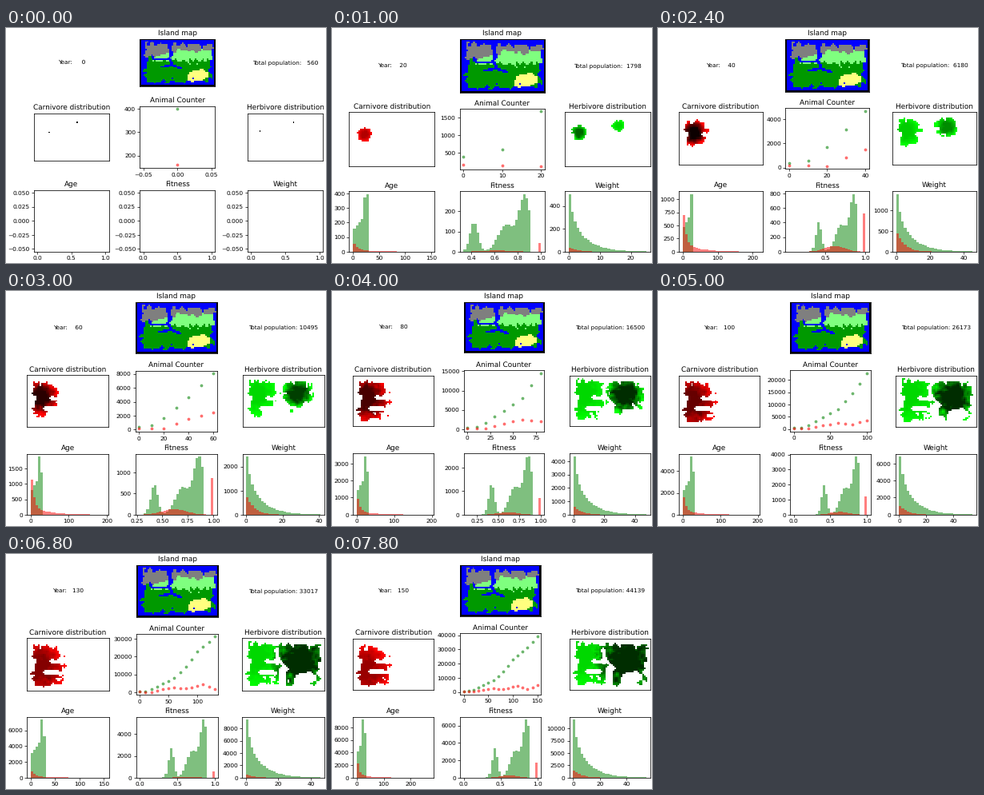
Write a matplotlib script that moves like this. It is 400 px wide and 294 px high and loops after 8 s.

```python
import matplotlib.pyplot as plt
import numpy as np
from matplotlib.animation import FuncAnimation

ZOOM = 1.07  # text and tick scale at 50 dpi
plt.rcParams.update({
    "font.family": "DejaVu Sans",
    "font.size": 10 * ZOOM,
    "text.hinting": "none",
    "axes.titlepad": 6 * ZOOM,
    "axes.linewidth": 1.1,
    **{f"{a}tick.major.{k}": 3.5 * ZOOM for a in "xy" for k in ("size", "pad")},
    "xtick.major.width": 1.0,
    "ytick.major.width": 1.0,
})

# Time runs in decades: one step every 500 ms
STEPS = np.arange(16)
HERBS = np.interp(STEPS, [0, 1, 2, 4, 6, 8, 10, 13, 15],
                  [400, 590, 1680, 4680, 8050, 14500, 22706, 31300, 39300]).round().astype(int)
CARNS = np.interp(STEPS, [0, 2, 4, 6, 8, 11, 13, 15],
                  [160, 118, 1500, 2445, 2000, 4200, 1717, 4839]).round().astype(int)

# Island
ROWS, COLS = 33, 52
X, Y = np.meshgrid(np.arange(COLS), np.arange(ROWS))
wob = np.random.default_rng(12).normal(size=(ROWS, COLS))
for axis in (0, 1, 0, 1):
    wob = wob + np.roll(wob, 1, axis)
wob /= wob.std()


def path(width, *points):
    """Cells closer than width to a polyline."""
    hit = np.zeros((ROWS, COLS), bool)
    for (x0, y0), (x1, y1) in zip(points, points[1:]):
        dx, dy = x1 - x0, y1 - y0
        t = np.clip(((X - x0) * dx + (Y - y0) * dy) / (dx * dx + dy * dy), 0, 1)
        hit |= np.hypot(X - x0 - t * dx, Y - y0 - t * dy) <= width
    return hit


land = ((abs(X - 26) < 22.3 + 0.9 * wob) & (abs(Y - 16.5) < 12.7 + 0.9 * wob)
        & (X + Y < 75 + wob))
river = (path(1.3, (20, 4), (21, 11)) | path(0.8, (21, 11), (19, 14), (9, 14), (8, 11))
         | path(0.8, (20, 13), (22, 18), (28, 20)) | path(0.7, (22, 18), (14, 19)))
desert = np.hypot((X - 39.5 - 0.5 * (25 - Y)) / 7, (Y - 25.5) / 4.2) < 1 + 0.08 * wob
barren = (path(1.2, (21, 7), (22, 13), (28, 19)) | path(1.2, (15, 14), (22, 15))
          | path(1.4, (11, 21), (19, 21)) | path(2.5, (25, 20), (25, 30)))
pasture = land & ~barren & ~desert


def island():
    rgb = np.zeros((ROWS, COLS, 3))
    rgb[:] = 0, 0, 1
    dry = land & ~river
    rgb[dry] = 0, 0.6, 0
    rgb[dry & (Y < 15 + wob) & (X > 8)] = 0.5, 1, 0.5
    rgb[dry & (Y < 13 - np.clip(X - 6, 0, 20) / 4 + wob)] = 0.5, 0.5, 0.5
    rgb[dry & desert] = 1, 1, 0.5
    rgb[[0, -1]] = rgb[:, [0, -1]] = 0
    return rgb


def herd(cx, cy, r, crowd):
    """Density of one herd, -1 where there are no animals."""
    d = np.hypot(X - round(cx), Y - round(cy))
    if r < 1:
        dens = np.ones_like(d)
    else:
        dens = crowd * np.clip(1.6 * (1.05 - d / r) + 0.15 * wob, 0, 1)
    return np.where((d + 0.13 * r * wob < r) & pasture, dens, -1)


def tint(dens, channel):
    rgb = np.ones((ROWS, COLS, 3))
    rgb[dens >= 0] = 0
    rgb[..., channel] = np.where(dens >= 0, 1 - dens, 1)
    return rgb


def herbivores(s):
    west = herd(8, 12, min(0.6 + 2 * s, 18), max(0.15, 1 - 0.2 * s))
    west[(X > 21) & (s > 0)] = -1
    drift = min(s, 10)
    east = herd(31 + 0.5 * drift, 6 + 0.8 * drift, 0.6 + 1.5 * s, min(0.15 * abs(s - 1), 0.82))
    return tint(np.maximum(west, east), 1)


def carnivores(s):
    west = herd(10 - 0.3 * min(s, 10), 13 + 0.6 * max(s - 4, 0), min(0.6 + 1.75 * s, 16),
                np.interp(s, [2, 4, 10, 15], [0.3, 0.95, 0.6, 0.4]))
    east = herd(29, 6, 0.6 * (s == 0), 1)
    return tint(np.maximum(west, east), 0)


# Histograms
BINS = 30


def bell(x, mid, width):
    return np.exp(-0.5 * ((x - mid) / width) ** 2)


def peaked(shape, peak):
    return peak * shape / shape.max()


def histograms(s):
    """Edges, herbivore counts and carnivore counts of the three charts."""
    def bins(low, high):
        edges = np.linspace(low, high, BINS + 1)
        return edges, (edges[1:] + edges[:-1]) / 2

    def key(*values):
        return np.interp(s, [2, 4, 6, 10, 13, 15], values)

    h, c = HERBS[s], CARNS[s]

    ages, a = bins(0, key(149, 218, 195, 195, 153, 272))
    herb = (0.4 + 0.012 * a + 0.35 * (abs(a - 24) < 4)) * (a < 32)
    carn = 0.85 * np.exp(-a / 7) + 0.15 * np.exp(-a / 45)
    age = ages, peaked(herb, 0.235 * h), peaked(carn, 0.47 * c)

    fits, f = bins(key(0.33, 0.05, 0.27, 0, 0, 0), 1)
    herb = 0.53 * bell(f, 0.42, 0.035) + 0.48 * bell(f, 0.7, 0.07) + bell(f, 0.86, 0.05)
    carn = 0.15 * bell(f, 0.62, 0.12) + (f == f[-1])
    fit = fits, peaked(herb * (f < 0.905), 0.17 * h), peaked(carn, 0.35 * c)

    weights, w = bins(0, key(25, 45, 41, 54, 46, 55))
    u = w / weights[-1]
    herb = 0.4 * np.exp(-u / 0.04) + 0.5 * np.exp(-u / 0.2)
    carn = np.exp(-u / 0.1)
    return age, fit, (weights, peaked(herb, 0.3 * h), peaked(carn, 0.3 * c))


# Figure
fig = plt.figure(figsize=(8, 5.88), dpi=50, layout="constrained")
pad = 3 / 72 * ZOOM
fig.get_layout_engine().set(w_pad=pad, h_pad=pad)
axes = fig.subplots(3, 3)
(year_ax, map_ax, total_ax), (carn_ax, count_ax, herb_ax), hist_axes = axes


def label(ax):
    ax.axis("off")
    return ax.text(0.5, 0.5, "", ha="center", va="center")


def picture(ax, title, rgb):
    ax.set(title=title, xticks=[], yticks=[])
    return ax.imshow(rgb, interpolation="nearest")


year_text = label(year_ax)
total_text = label(total_ax)
picture(map_ax, "Island map", island())
carn_img = picture(carn_ax, "Carnivore distribution", carnivores(0))
herb_img = picture(herb_ax, "Herbivore distribution", herbivores(0))


def draw_counter(s):
    count_ax.clear()
    count_ax.set_title("Animal Counter")
    for counts, color in ((HERBS, "green"), (CARNS, "red")):
        count_ax.scatter(10 * STEPS[:s + 1], counts[:s + 1], s=20,
                         color=color, alpha=0.5, linewidths=1)


def draw_histograms(s):
    charts = histograms(s)
    for ax, title, (edges, herb, carn) in zip(hist_axes, ("Age", "Fitness", "Weight"), charts):
        ax.clear()
        ax.set_title(title)
        if s == 0:  # no data yet
            ax.set(xlim=(-0.05, 1.05), ylim=(-0.055, 0.055))
            continue
        for counts, color in ((herb, "green"), (carn, "red")):
            ax.stairs(counts, edges, fill=True, color=color, alpha=0.5, linewidth=0)
        margin = 0.05 * (edges[-1] - edges[0])
        ax.set(xlim=(edges[0] - margin, edges[-1] + margin),
               ylim=(0, 1.05 * max(herb.max(), carn.max())))


def update(frame):
    s = frame * 2 // 5
    year_text.set_text(f"Year: {10 * s:5}")
    total_text.set_text(f"Total population: {HERBS[s] + CARNS[s]:5}")
    carn_img.set_data(carnivores(s))
    herb_img.set_data(herbivores(s))
    draw_counter(s)
    draw_histograms(s)


anim = FuncAnimation(fig, update, frames=40, interval=200, repeat=True,
                     repeat_delay=0, cache_frame_data=False)
plt.show()
```
